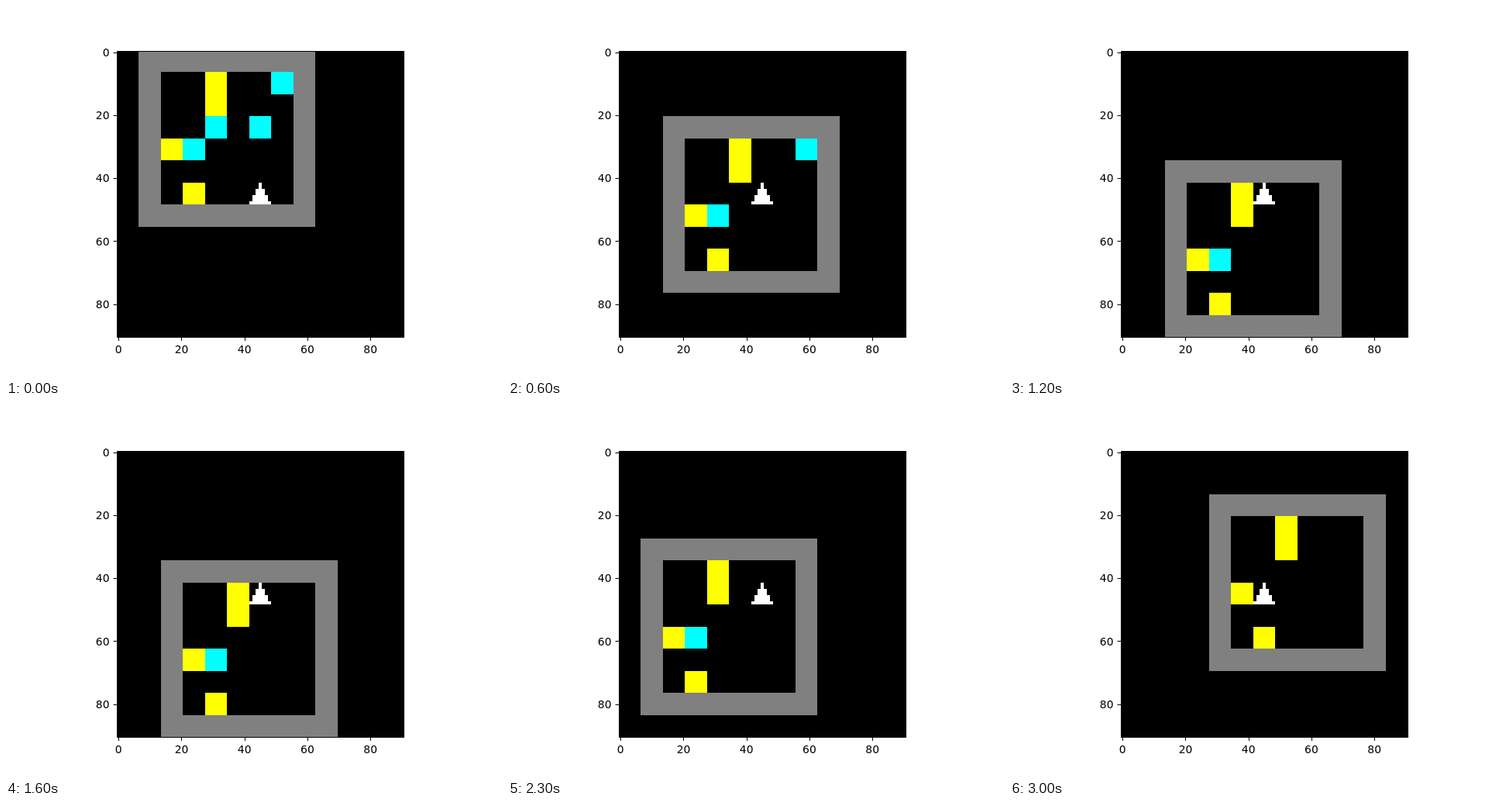
These frames come from a looping animation (640x480 px, 3.1 s). An HTML page with a canvas:

```html
<!DOCTYPE html>
<html lang="en">
<head>
<meta charset="utf-8">
<title>Grid walk</title>
<style>
  html, body { margin: 0; width: 100%; height: 100%; overflow: hidden; background: #fff; }
  canvas { display: block; }
</style>
</head>
<body>
<canvas id="stage" width="640" height="480"></canvas>
<script>
const ctx = document.getElementById('stage').getContext('2d');

const STEP = 100;                 // ms per move
const MOVES = 'UUULLRRRUULL..RLRR.LLDRDLDRLLL';
const DIRS = { U: [0, -1], D: [0, 1], L: [-1, 0], R: [1, 0], '.': [0, 0] };
const ROOM = 8, TILE = 7, CENTER = 6;
const YELLOW = [[3, 1], [3, 2], [1, 4], [2, 6]];
const CYAN = [[6, 1], [3, 3], [5, 3], [2, 4]];

// Walker position in the room after each move
const path = [[5, 6]];
for (const m of MOVES) {
  const [x, y] = path[path.length - 1];
  path.push([x + DIRS[m][0], y + DIRS[m][1]]);
}

// Plot cell to screen pixel
const px = i => Math.round(143 + i * 370 / 91);
const py = i => Math.round(57 + i * 370 / 91);

function cells(x, y, w, h, color) {
  ctx.fillStyle = color;
  ctx.fillRect(px(x), py(y), px(x + w) - px(x), py(y + h) - py(y));
}

const tiles = (x, y, w, h, color) =>
  cells(x * TILE, y * TILE, w * TILE, h * TILE, color);

function drawWalker() {
  const x = CENTER * TILE, y = CENTER * TILE;
  for (let r = 0; r < TILE; r++) {
    const half = r >> 1;
    cells(x + 3 - half, y + r, 2 * half + 1, 1, '#fff');
  }
}

function drawAxes() {
  ctx.fillStyle = '#000';
  ctx.fillRect(143, 58, 371, 1);
  ctx.fillRect(143, 427, 371, 1);
  ctx.fillRect(143, 58, 1, 370);
  ctx.fillRect(513, 58, 1, 370);
  ctx.font = '13.89px "DejaVu Sans", sans-serif';
  for (let v = 0; v <= 80; v += 20) {
    const d = (v + 0.5) * 369.6 / 91;
    const x = 143.2 + d, y = 57.6 + d;
    ctx.fillRect(Math.round(x), 428, 1, 4);
    ctx.fillRect(138.5, Math.round(y), 4.5, 1);
    ctx.textAlign = 'center';
    ctx.fillText(v, x, 448);
    ctx.textAlign = 'right';
    ctx.fillText(v, 133.5, Math.round(y + 5.3));
  }
}

function draw(step) {
  const [ax, ay] = path[step];
  const left = CENTER - ax, top = CENTER - ay;
  const eaten = ([x, y]) =>
    path.slice(0, step + 1).some(p => p[0] === x && p[1] === y);
  const item = color => ([x, y]) => tiles(left + x, top + y, 1, 1, color);

  ctx.fillStyle = '#fff';
  ctx.fillRect(0, 0, 640, 480);
  ctx.fillStyle = '#000';
  ctx.fillRect(143, 58, 371, 370);
  ctx.save();
  ctx.beginPath();
  ctx.rect(143, 58, 371, 370);
  ctx.clip();
  tiles(left, top, ROOM, ROOM, '#808080');
  tiles(left + 1, top + 1, ROOM - 2, ROOM - 2, '#000');
  YELLOW.forEach(item('#ff0'));
  CYAN.filter(c => !eaten(c)).forEach(item('#0ff'));
  drawWalker();
  ctx.restore();
  drawAxes();
}

const start = performance.now();
let shown = -1;

function tick() {
  const step = Math.floor((performance.now() - start) / STEP) % path.length;
  if (step !== shown) draw(shown = step);
  requestAnimationFrame(tick);
}
tick();
</script>
</body>
</html>
```
